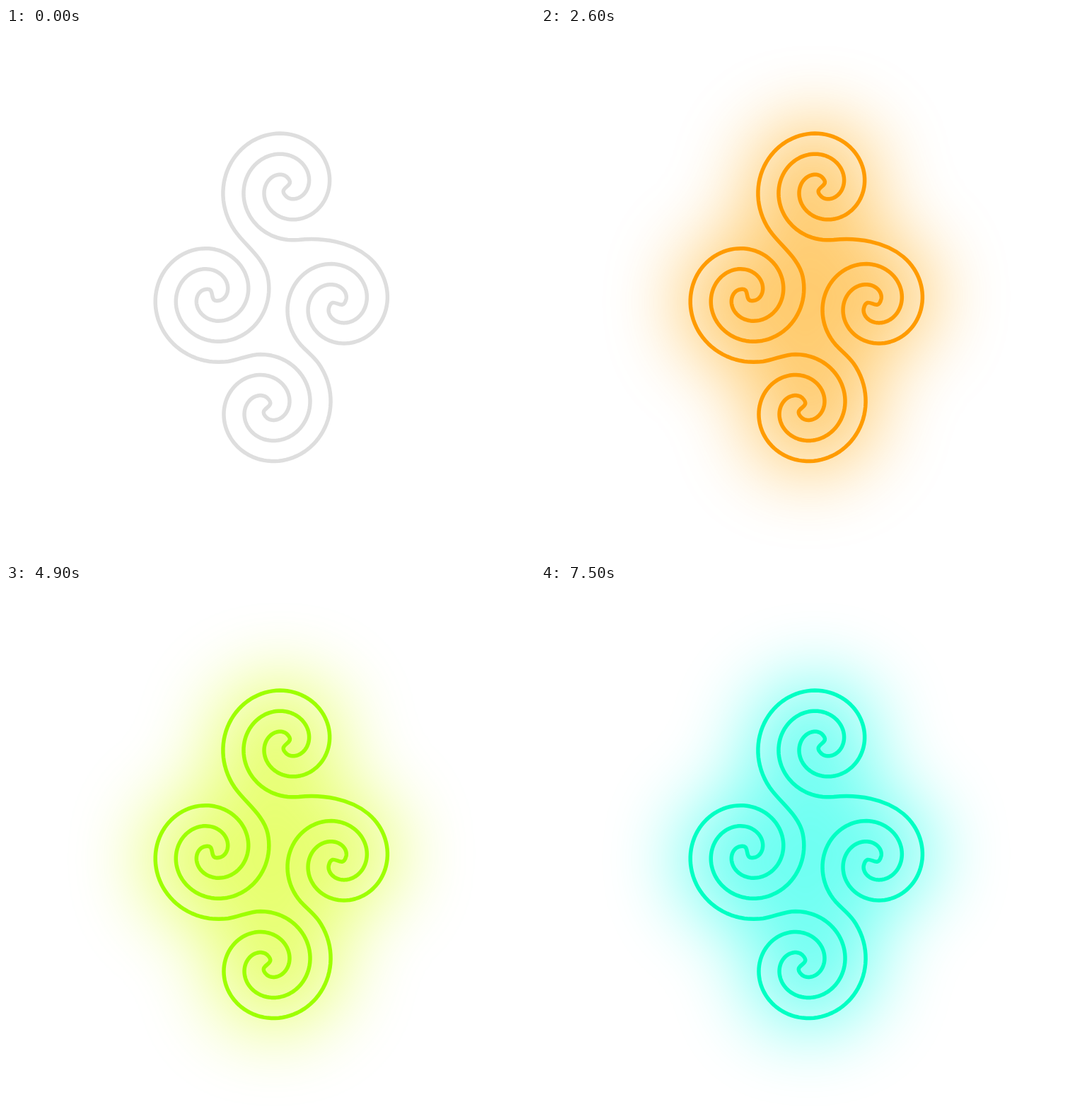
An HTML page for the animation above (8000 ms loop, 748 by 748 pixels).

```html
<!DOCTYPE html>
<html lang="en">
<head>
<meta charset="utf-8">
<title>Four spirals</title>
<style>
  html, body { margin: 0; width: 100%; height: 100%; overflow: hidden; background: #fff; }
  svg { display: block; width: 100%; height: 100%; }
  path { stroke: currentColor; stroke-linejoin: round; }
</style>
</head>
<body>
<svg viewBox="0 0 748 748">
  <defs>
    <filter id="blur" filterUnits="userSpaceOnUse" x="-100" y="-100" width="948" height="948" color-interpolation-filters="sRGB">
      <feGaussianBlur stdDeviation="53"/>
    </filter>
  </defs>
  <g id="glow">
    <path filter="url(#blur)" fill="currentColor" stroke-width="30"/>
  </g>
  <path id="line" fill="none" stroke-width="5.5"/>
</svg>
<script>
const LOOP = 8000;
const A = 9.25;      // radius of the circle each spiral unwinds from
const INNER = 64;    // degrees of unwinding where an arm begins
const HOOK = 21;     // handle length of the curl that joins two arms

// centre x, centre y, start angle and end angle of the arm going in, end angle of the arm going out
const lobes = [
  [291.5, 377.5, -137.5, 372, 638],
  [369, 537, -18, 450, 755],
  [468.7, 389.8, 102, 585, 770],
  [396.8, 224.5, -197, 276, 578]
];

function spot(cx, cy, zero, deg) {
  const t = deg * Math.PI / 180, p = A * (deg - zero) * Math.PI / 180;
  const hx = -Math.sin(t), hy = -Math.cos(t);
  return { x: cx + p * Math.cos(t) + A * hx, y: cy - p * Math.sin(t) + A * hy, hx, hy };
}

function arm(cx, cy, zero, end) {
  const from = zero + INNER, n = Math.ceil((end - from) / 4);
  return Array.from({ length: n + 1 }, (_, i) => spot(cx, cy, zero, from + (end - from) * i / n));
}

const fmt = (x, y) => x.toFixed(2) + ' ' + y.toFixed(2);
const lines = pts => pts.map(p => 'L' + fmt(p.x, p.y)).join('');

// k and m are signed handle lengths along the heading at each end
const curve = (p, k, q, m) => 'C' + [
  fmt(p.x + k * p.hx, p.y + k * p.hy),
  fmt(q.x + m * q.hx, q.y + m * q.hy),
  fmt(q.x, q.y)
].join(' ');

function outline() {
  const arms = lobes.map(([cx, cy, zero, inEnd, outEnd]) => ({
    into: arm(cx, cy, zero, inEnd).reverse(),
    out: arm(cx, cy, zero + 180, outEnd)
  }));
  let d = 'M' + fmt(arms[0].into[0].x, arms[0].into[0].y);
  arms.forEach(({ into, out }, i) => {
    const p = out[out.length - 1], q = arms[(i + 1) % arms.length].into[0];
    const k = 0.33 * Math.hypot(q.x - p.x, q.y - p.y);
    d += lines(into) + curve(into[into.length - 1], -HOOK, out[0], -HOOK) + lines(out) + curve(p, k, q, k);
  });
  return d + 'Z';
}

const d = outline();
document.querySelectorAll('svg > path, #glow path').forEach(el => el.setAttribute('d', d));

// start time, line colour, glow colour (none while the figure rests)
const steps = [
  [0, '#dedede'],
  [300, '#ff0000', '#ff0000'],
  [1800, '#ebebeb'],
  [2100, '#ff6600', '#ff6600'],
  [2600, '#ff9b00', '#ffa400'],
  [3100, '#ffcc00', '#ffcc00'],
  [3600, '#ebebeb'],
  [3900, '#ffff00', '#ffff00'],
  [4400, '#ccff00', '#e6ff00'],
  [4900, '#9dff00', '#d4ff00'],
  [5400, '#dedede'],
  [5700, '#00ff00', '#00ff00'],
  [7200, '#ebebeb'],
  [7500, '#00ffc3', '#00ffe8']
];

function play(id, frame) {
  const keys = steps.map(s => ({ offset: s[0] / LOOP, easing: 'step-end', ...frame(s) }));
  keys.push({ ...keys[keys.length - 1], offset: 1 });
  const anim = document.getElementById(id).animate(keys, { duration: LOOP, iterations: Infinity });
  anim.startTime = 0;
}

play('line', ([, color]) => ({ color }));
play('glow', ([, , color]) => ({ color: color || '#ffffff', opacity: color ? 0.57 : 0 }));
</script>
</body>
</html>
```
